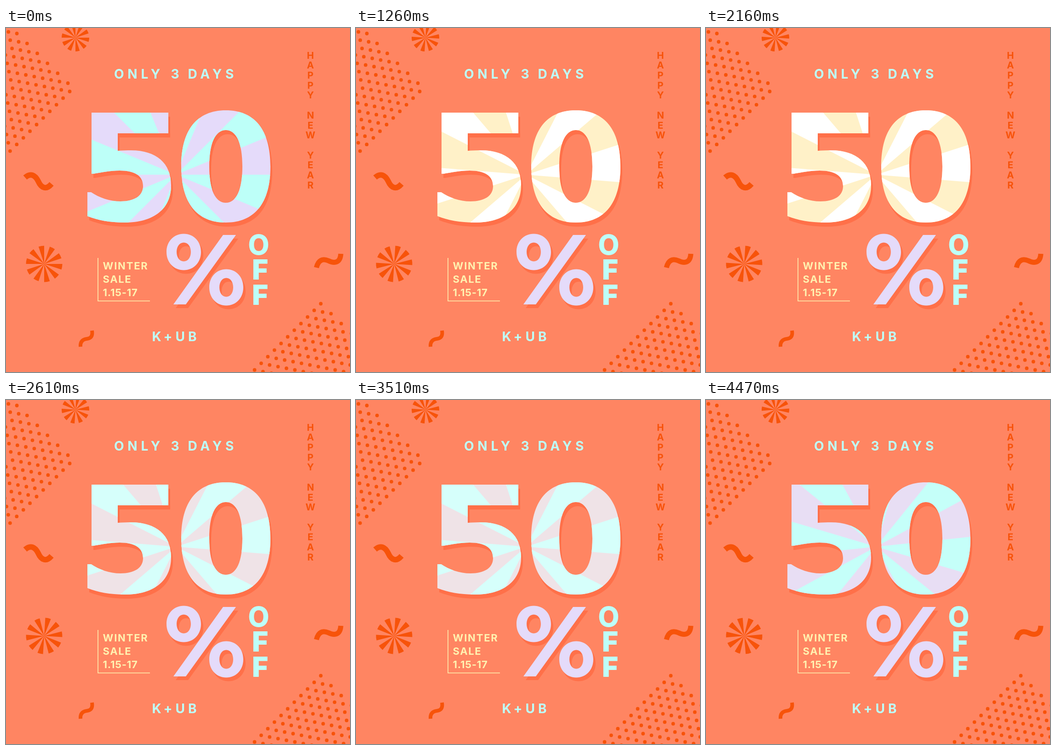
These frames come from a looping animation (748 px wide and 748 px high, 4500 ms). An HTML page with a canvas:

```html
<!DOCTYPE html>
<html lang="en">
<head>
<meta charset="utf-8">
<title>Winter sale</title>
<style>
html, body { margin: 0; width: 100%; height: 100%; overflow: hidden; background: #ff8562; }
canvas { display: block; }
</style>
</head>
<body>
<canvas id="stage" width="748" height="748"></canvas>
<script>
const ctx = document.getElementById('stage').getContext('2d');
const CYCLE = 900, STEP = 30, FADE = 240;
const CORAL = '#ff8562', ORANGE = '#f7530a', SHADOW = '#ff7049';
const MINT = '#bdfff8', LILAC = '#e5dbfa', BUTTER = '#fff2b0';
const RAY_CENTER = [370, 319];

// Rounded closed curve; k sets how square the shoulders are.
function oval(cx, cy, rx, ry, k) {
  const hx = rx * k, hy = ry * k;
  return `M${cx - rx} ${cy}` +
    `C${cx - rx} ${cy - hy} ${cx - hx} ${cy - ry} ${cx} ${cy - ry}` +
    `C${cx + hx} ${cy - ry} ${cx + rx} ${cy - hy} ${cx + rx} ${cy}` +
    `C${cx + rx} ${cy + hy} ${cx + hx} ${cy + ry} ${cx} ${cy + ry}` +
    `C${cx - hx} ${cy + ry} ${cx - rx} ${cy + hy} ${cx - rx} ${cy}Z`;
}

const five = 'M186 184H353V229H243V267C253 266 263 266 272 266C327 266 359 294 359 342' +
  'C359 394 321 423 258 423C226 423 200 418 177 409V357H185C203 369 225 377 249 377' +
  'C279 377 298 365 298 344C298 322 281 310 247 310C225 310 208 314 190 317H186Z';
const digits = new Path2D(five + oval(478, 301, 97, 122, .65) + oval(478, 301, 36, 79, .64));
const percent = new Path2D(
  oval(386.5, 487, 37.5, 39.5, .58) + oval(386.5, 487, 15.5, 20.5, .58) +
  oval(479, 564, 37, 39.5, .58) + oval(479, 564, 15, 20.5, .58) +
  'M472 450H500L391 601H364Z');

const squiggles = [
  ['M41.5 325C53 315 63 319 70 333C77 349 88 352 99 339', 12],
  ['M675 521C679 504 689 501 701 506C715 513 727 510 728 491', 11],
  ['M162 693C161 681 168 677 175 676C184 675 189 671 187 658', 8]
];

function shape(path, color, dx = 0, dy = 0) {
  ctx.save();
  ctx.translate(dx, dy);
  ctx.fillStyle = color;
  ctx.fill(path, 'evenodd');
  ctx.restore();
}

function text(str, x, y, size, color, spacing = 0, align = 'left', weight = 700) {
  ctx.font = `${weight} ${size}px Inter, "Open Sans", sans-serif`;
  ctx.letterSpacing = spacing + 'px';
  ctx.textAlign = align;
  ctx.fillStyle = color;
  ctx.fillText(str, x, y);
}

// Evenly spaced sectors, each followed by a gap of the same angle.
function sectors(cx, cy, radius, count, turn) {
  const width = Math.PI / count;
  ctx.beginPath();
  for (let i = 0; i < count; i++) {
    const start = turn + i * 2 * width;
    ctx.moveTo(cx, cy);
    ctx.arc(cx, cy, radius, start, start + width);
  }
  ctx.fill();
}

function dot(x, y) {
  ctx.moveTo(x + 3.9, y);
  ctx.arc(x, y, 3.9, 0, Math.PI * 2);
}

// Diagonal rows of dots, every other row set in by half a pitch.
function dots() {
  const pitch = 14.4, shiftX = 3.9, shiftY = 18;
  ctx.fillStyle = ORANGE;
  ctx.beginPath();
  for (let row = 0; row < 14; row++) {
    const inset = Math.floor(row / 2);
    for (let j = inset; j < 11; j++) {
      dot(138.5 - shiftX * row - pitch * j, 138 - shiftY * row + pitch * j);
    }
    for (let j = -inset; j < 11; j++) {
      dot(684.5 + shiftX * row - pitch * j, 599.5 + shiftY * row + pitch * j);
    }
  }
  ctx.fill();
}

function mix(a, b, amount) {
  return `rgb(${a.map((v, i) => Math.round(v + (b[i] - v) * amount))})`;
}

function backdrop() {
  ctx.fillStyle = CORAL;
  ctx.fillRect(0, 0, 748, 748);
  dots();
  ctx.strokeStyle = ORANGE;
  for (const [path, width] of squiggles) {
    ctx.lineWidth = width;
    ctx.stroke(new Path2D(path));
  }
}

function rays(turn, warmth) {
  shape(digits, SHADOW, 4, 9);
  ctx.save();
  ctx.clip(digits, 'evenodd');
  ctx.fillStyle = mix([229, 219, 250], [255, 241, 200], warmth);
  ctx.fillRect(170, 170, 420, 270);
  ctx.fillStyle = mix([189, 255, 248], [255, 255, 255], warmth);
  sectors(...RAY_CENTER, 320, 8, turn);
  ctx.restore();
}

function percentSign() {
  shape(percent, SHADOW, 5, 8);
  shape(percent, LILAC);
}

function captions() {
  text('ONLY', 235, 110, 28, MINT, 7.8);
  text('3', 358.5, 110, 28, MINT);
  text('DAYS', 395.5, 110, 28, MINT, 7.8);
  text('K+UB', 317.5, 681, 28, MINT, 7);

  [...'HAPPY NEW YEAR'].forEach((letter, i) =>
    text(letter, 662, 66.6 + i * 21.7, 20.5, ORANGE, 0, 'center'));

  text('O', 549.5, 493, 60, MINT, 0, 'center', 800);
  text('F', 552.5, 547, 60, MINT, 0, 'center', 900);
  text('F', 552.5, 601.5, 60, MINT, 0, 'center', 900);

  text('WINTER', 210.5, 525, 22, BUTTER, 1.8);
  text('SALE', 210.5, 554, 22, BUTTER, 1.6);
  text('1.15-17', 210.5, 583, 22, BUTTER, .8);
  ctx.strokeStyle = BUTTER;
  ctx.lineWidth = 1.6;
  ctx.stroke(new Path2D('M200 500V593.5H313'));
}

function draw(ms) {
  const time = Math.floor(ms / STEP) * STEP % CYCLE;
  const phase = time / CYCLE;
  const warmth = Math.min(1, time / FADE, (CYCLE - time) / FADE);

  backdrop();
  ctx.fillStyle = ORANGE;
  const wheelTurn = phase * Math.PI * .8;
  sectors(151, 21, 30, 10, wheelTurn);
  sectors(83, 513, 39.5, 10, wheelTurn);
  rays(phase * Math.PI, warmth);
  percentSign();
  captions();
}

const began = performance.now();
function tick() {
  draw(performance.now() - began);
  requestAnimationFrame(tick);
}
tick();
</script>
</body>
</html>
```
